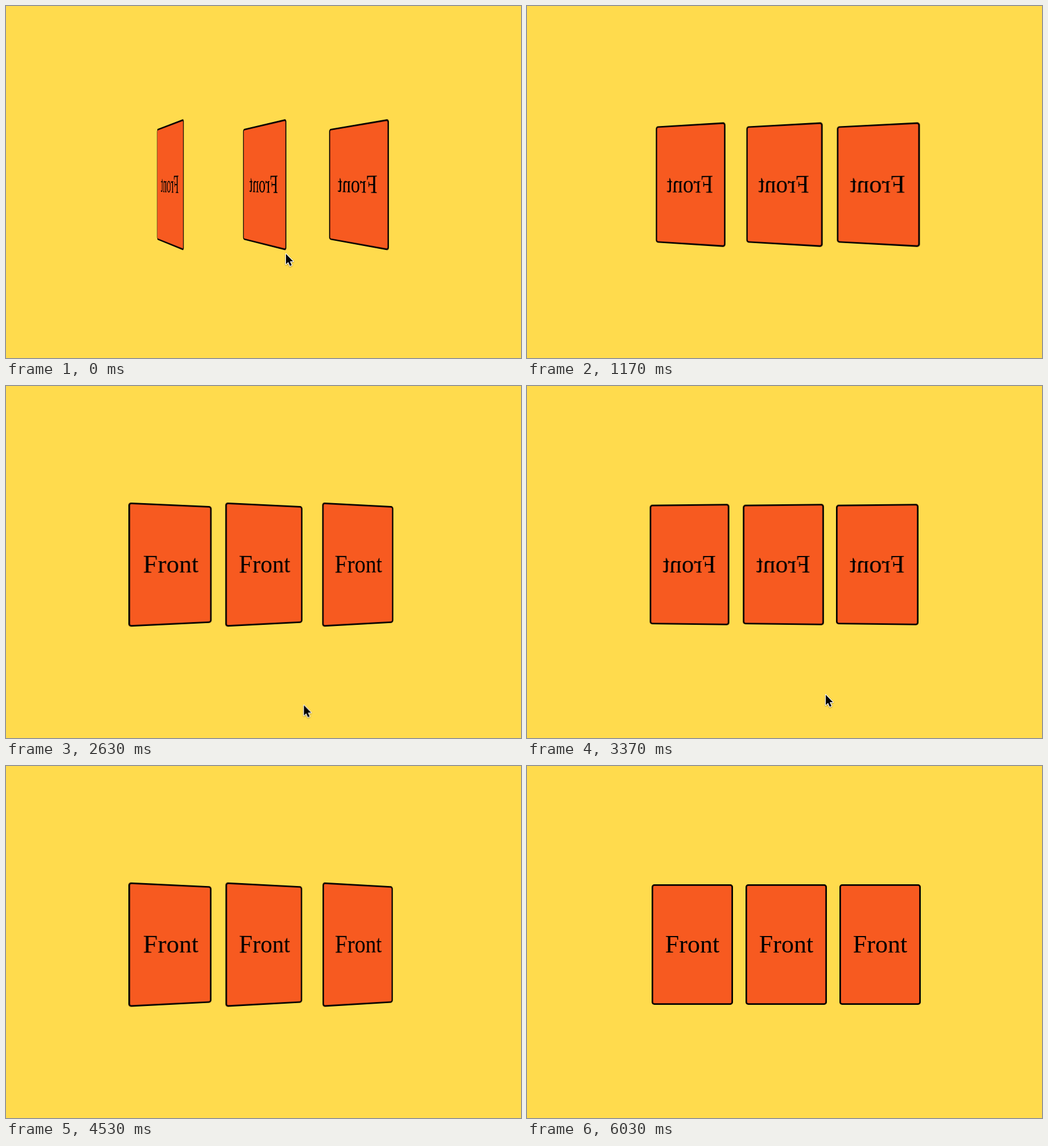
These frames come from a looping animation (905x619 px, 6310 ms). An HTML page:

```html
<!DOCTYPE html>
<html lang="en">
<head>
<meta charset="utf-8">
<title>Card flip</title>
<style>
  :root { --loop: 6310ms; }

  html, body {
    margin: 0;
    width: 100%;
    height: 100%;
    overflow: hidden;
    background: #ffdb4d;
  }

  .scene {
    position: absolute;
    left: 0;
    top: 0;
    width: 905px;
    height: 619px;
    overflow: hidden;
    perspective: 687.5px;
    perspective-origin: 452.5px 310.8px;
  }

  /* Faces are wider than the card by their borders, so the axis sits left of their centre. */
  .card {
    position: absolute;
    left: calc(218.75px + 165px * var(--i));
    top: 207.7px;
    width: 137.5px;
    height: 206.25px;
    animation: flip var(--loop) infinite;
  }

  .face {
    position: absolute;
    left: 0;
    top: 0;
    width: 143px;
    height: 211.75px;
    display: flex;
    align-items: center;
    justify-content: center;
    border-radius: 5px;
    box-shadow: inset 0 0 0 2.75px #000;
    font: 44px "Liberation Serif", serif;
    color: #000;
  }

  .front { background: #f75a20; }

  .back {
    background: #29bbae;
    transform: scaleX(-1);
    animation: flash var(--loop) step-end infinite;
  }

  .cursor {
    position: absolute;
    left: 0;
    top: 0;
    width: 20px;
    height: 28px;
    overflow: visible;
    filter: drop-shadow(0 1px 1px rgba(0, 0, 0, .35));
    animation: point var(--loop) infinite;
  }

  /* Enters mid-flip, then back, forth and back again. */
  @keyframes flip {
    0% { transform: rotateY(121.8deg); animation-timing-function: cubic-bezier(.205, .554, .503, 1); }
    10.143% { transform: rotateY(180deg); }
    16.704% { transform: rotateY(180deg); animation-timing-function: ease; }
    33.502% { transform: rotateY(0deg); }
    39.952% { transform: rotateY(0deg); animation-timing-function: ease; }
    56.751% { transform: rotateY(180deg); }
    61.521% { transform: rotateY(180deg); animation-timing-function: ease; }
    78.32%, 100% { transform: rotateY(0deg); }
  }

  @keyframes flash {
    0% { visibility: hidden; }
    25.2% { visibility: visible; }
    25.83%, 100% { visibility: hidden; }
  }

  @keyframes point {
    0% { transform: translate(491px, 434px); }
    11.886% { transform: translate(491px, 434px); animation-timing-function: ease-in; }
    16.64% { transform: translate(500px, 626px); }
    39.62% { transform: translate(521px, 626px); animation-timing-function: ease-out; }
    41.68% { transform: translate(522.5px, 559.5px); animation-timing-function: ease-out; }
    45.17% { transform: translate(524px, 541px); }
    60.697% { transform: translate(524px, 541px); animation-timing-function: ease-in; }
    61.727%, 100% { transform: translate(527px, 630px); }
  }
</style>
</head>
<body>
  <div class="scene">
    <div class="card" style="--i: 0"><div class="face front">Front</div><div class="face back">Back</div></div>
    <div class="card" style="--i: 1"><div class="face front">Front</div><div class="face back">Back</div></div>
    <div class="card" style="--i: 2"><div class="face front">Front</div><div class="face back">Back</div></div>
    <svg class="cursor" viewBox="0 0 20 28">
      <path d="M1 2V20L5 16.2L8 23L11 21.7L8 15H13.5Z" stroke="#fff" stroke-width="2.4" stroke-linejoin="round" paint-order="stroke"/>
    </svg>
  </div>
</body>
</html>
```
